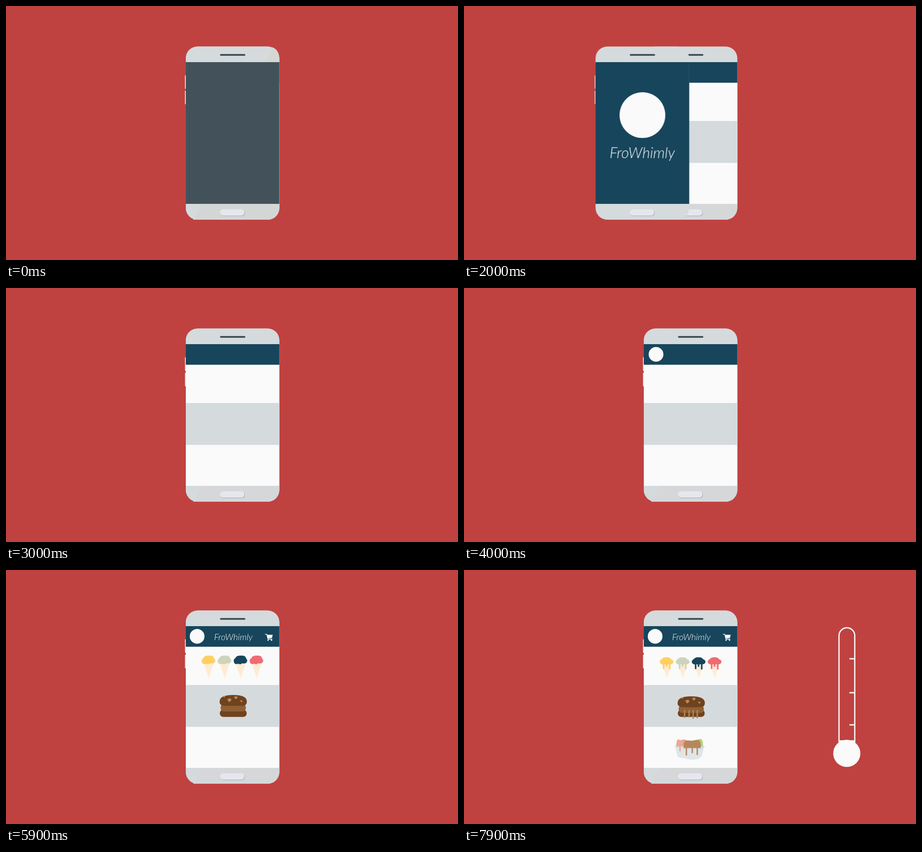
Recreate the animation shown at these times as an HTML page. Size 998 px wide and 561 px high, loop 8000 ms.

```html
<!DOCTYPE html>
<html lang="en">
<head>
<meta charset="utf-8">
<title>Ice cream app</title>
<style>
  html, body { margin: 0; width: 100%; height: 100%; overflow: hidden; background: #bf4240; }
  svg { position: absolute; inset: 0; width: 100%; height: 100%; display: block; }

  /* Every animation spans the whole loop: 1% = 80 ms. */
  .anim, .scoop, .drip, .melt { animation: 8s cubic-bezier(.65, 0, .35, 1) infinite both; }
  .pop { transform-box: fill-box; transform-origin: center; animation-timing-function: cubic-bezier(.33, 1, .68, 1); }

  .name { font: italic 300 33px Lato, sans-serif; fill: #fafafa; text-anchor: middle; }
  .small { font-size: 19.5px; }

  #splash { z-index: 3; animation-name: shuffle, restack; animation-timing-function: cubic-bezier(.65, 0, .35, 1), step-end; }
  #app { z-index: 2; }
  #gauge { z-index: 4; }
  @keyframes shuffle {
    0%, 21.25% { transform: translateX(0); }
    28.75% { transform: translateX(-21.15vw); }
    36.25%, 100% { transform: translateX(0); }
  }
  @keyframes restack { 0% { z-index: 3; } 28.75%, 100% { z-index: 1; } }

  .blue { animation-name: blue; }
  @keyframes blue { 0%, 3.75% { opacity: 0; } 7.5%, 100% { opacity: 1; } }
  .sheen { animation-name: sheen; }
  @keyframes sheen { 0%, 3.75% { opacity: 1; } 15%, 100% { opacity: 0; } }
  .badge { animation-name: badge; }
  @keyframes badge { 0%, 6.25% { transform: scale(0); } 11.25%, 100% { transform: scale(1); } }
  .brand { animation-name: brand; }
  @keyframes brand { 0%, 10% { opacity: 0; } 15%, 100% { opacity: 1; } }

  .logo { animation-name: logo; animation-timing-function: cubic-bezier(.3, .5, .4, 1); }
  @keyframes logo {
    0%, 45% { transform: translateX(-440px); }
    50% { transform: translateX(2px); }
    52.5%, 100% { transform: translateX(0); }
  }
  .title { animation-name: title; }
  @keyframes title { 0%, 51.25% { transform: scale(0); } 55%, 100% { transform: scale(1); } }
  .cart { animation-name: cart; }
  @keyframes cart { 0%, 55% { transform: translateX(430px); } 60%, 100% { transform: translateX(0); } }

  .cone1 { animation-name: cone1; }
  .cone2 { animation-name: cone2; }
  .cone3 { animation-name: cone3; }
  .cone4 { animation-name: cone4; }
  .cake { animation-name: cake; }
  .tub { animation-name: tub; }
  @keyframes cone1 { 0%, 58.125% { transform: scale(0); } 61.875%, 100% { transform: scale(1); } }
  @keyframes cone2 { 0%, 60% { transform: scale(0); } 63.75%, 100% { transform: scale(1); } }
  @keyframes cone3 { 0%, 61.875% { transform: scale(0); } 65.625%, 100% { transform: scale(1); } }
  @keyframes cone4 { 0%, 63.75% { transform: scale(0); } 67.5%, 100% { transform: scale(1); } }
  @keyframes cake { 0%, 68.75% { transform: scale(0); } 72.5%, 100% { transform: scale(1); } }
  @keyframes tub { 0%, 73.75% { transform: scale(0); } 77.5%, 100% { transform: scale(1); } }

  .wipe { transform-origin: 815px 0; animation-name: wipe; }
  @keyframes wipe { 0%, 82.5% { transform: scaleX(0); } 87.5%, 100% { transform: scaleX(1); } }

  /* Melting */
  .drip { transform-box: fill-box; transform-origin: top; animation-name: drip; }
  @keyframes drip { 0%, 88.75% { transform: scaleY(0); } 98.75%, 100% { transform: scaleY(1); } }
  .scoop { animation-name: scoop; }
  @keyframes scoop {
    0%, 88.75% { d: path("M-11 194Q-10 189 1 189Q11 188 12 195Q16 199 14 203Q11 208 3 206Q0 210 -5 207Q-14 210 -15 202Q-16 197 -11 194Z"); }
    98.75%, 100% { d: path("M-11 197Q-6 192 0 193Q6 192 10 197Q16 199 15 204Q14 209 5 208Q0 209 -5 208Q-14 210 -15 203Q-15 199 -11 197Z"); }
  }
  .sag { animation-name: sag; }
  @keyframes sag { 0%, 88.75% { transform: translateY(0); } 98.75%, 100% { transform: translateY(3px); } }
  .pink { fill: #eda692; animation-name: pink; }
  @keyframes pink {
    0%, 88.75% { d: path("M469 391C469 376 476 368 484 368C493 368 499 376 499 391Z"); }
    98.75%, 100% { d: path("M468 391C470 374 470 372 478 376C489 372 495 374 497 391Z"); }
  }
  .green { fill: #b5d26f; animation-name: green; }
  @keyframes green {
    0%, 88.75% { d: path("M499 391C499 376 506 367 515 367C524 367 528 374 528 390Z"); }
    98.75%, 100% { d: path("M499 391C500 376 507 376 515 375C527 370 527 376 528 390Z"); }
  }
  .brown { fill: #b6875a; animation-name: brown; }
  @keyframes brown {
    0%, 88.75% { d: path("M485 394C485 378 493 369 504 369C515 369 523 378 523 394Z"); }
    98.75%, 100% { d: path("M485 394C484 374 488 376 504 377C520 374 523 374 523 394Z"); }
  }
</style>
</head>
<body>
<svg id="app" viewBox="0 0 998 561">
  <defs>
    <g id="frame">
      <rect x="395" y="153" width="5" height="30" rx="1.5" fill="#dcdcde"/>
      <rect x="395" y="187" width="5" height="30" rx="1.5" fill="#dcdcde"/>
      <rect x="397" y="89.5" width="206.5" height="382.5" rx="26" fill="#d5dadd"/>
      <rect x="472.5" y="106" width="56" height="4" rx="2" fill="#43525a"/>
    </g>
    <path id="lower" d="M433 437H603.5V446A26 26 0 0 1 577.5 472H413Z"/>
    <g id="home">
      <rect x="473" y="450" width="54.5" height="14" rx="7" fill="#a9a9b2"/>
      <rect x="472.5" y="449" width="54" height="14" rx="7" fill="#e6e6ee"/>
    </g>
  </defs>
  <use href="#frame"/>
  <use href="#lower" fill="#d6d7d9"/>
  <use href="#home"/>
  <path fill="#fafafa" d="M397 169h206.5v268H397z"/>
  <path fill="#d5dadd" d="M397 254h206.5v92.5H397z"/>
  <path fill="#17455c" d="M397 124h206.5v45.5H397z"/>

  <circle class="anim logo" cx="422" cy="146.5" r="16.3" fill="#fafafa"/>
  <text class="anim pop title name small" x="502" y="155">FroWhimly</text>
  <g class="anim cart" fill="#fafafa">
    <path d="M572.5 142h3.3l2.6 10.6h9" fill="none" stroke="#fafafa" stroke-width="1.6" stroke-linejoin="round" stroke-linecap="round"/>
    <path d="M576 143H588.8L587.4 150L578 151.2Z"/>
    <circle cx="578.7" cy="155" r="1.6"/><circle cx="586.2" cy="155" r="1.6"/>
  </g>

  <g id="cones"></g>

  <g class="anim pop cake">
    <rect x="472" y="308.5" width="59.5" height="16" rx="8" fill="#70431f"/>
    <rect class="anim sag" x="474" y="296" width="55.5" height="16.5" rx="7" fill="#8f6036"/>
    <g class="drips" data-drips="487 309 327,497 309 326,506 309 329,515 309 328" fill="#b2845a"></g>
    <g class="anim sag">
      <path fill="#70431f" d="M472 288Q474 276 502 276Q529 276 531.5 288Q533 298 525 299.5Q502 301 478 299.5Q470 297 472 288Z"/>
      <path fill="#b98b5c" d="M479 279l5-1.5-1 4.500zM488 286l7-3 3 4-5 5zM504 279l8 1-3 5-4-1zM516 288l6 0-1 5z"/>
    </g>
  </g>

  <g class="anim pop tub">
    <path class="melt pink" d="M469 391C469 376 476 368 484 368C493 368 499 376 499 391Z"/>
    <path class="melt green" d="M499 391C499 376 506 367 515 367C524 367 528 374 528 390Z"/>
    <path fill="#e0e6e8" d="M467 391H530L525 412Q512 417 490 415Q473 416 471 411Z"/>
    <path fill="#cfd5d8" d="M466 389h65v2.500h-65z"/>
    <path class="melt brown" d="M485 394C485 378 493 369 504 369C515 369 523 378 523 394Z"/>
    <path fill="#e0e6e8" d="M483 394H525L521 416Q504 422 487 416Z"/>
    <path fill="#cfd5d8" d="M482 393h44v2.500h-44z"/>
    <g class="drips" data-drips="477 389 401" fill="#eda692"></g>
    <g class="drips" data-drips="491 392 410,504 392 405,515 392 409" fill="#b6875a"></g>
  </g>
</svg>

<svg id="splash" class="anim" viewBox="0 0 998 561">
  <use href="#frame"/>
  <g class="anim sheen">
    <path fill="#d6d6d3" d="M588 91Q603 97 603.5 116V124H575Z"/>
    <use href="#lower" fill="#d4d6d6"/>
  </g>
  <use href="#home"/>
  <path fill="#43525a" d="M397 124h206.5v313H397z"/>
  <path class="anim blue" fill="#17455c" d="M397 124h206.5v313H397z"/>
  <circle class="anim pop badge" cx="500.5" cy="241" r="50.500" fill="#fafafa"/>
  <text class="anim brand name" x="500" y="336">FroWhimly</text>
</svg>

<svg id="gauge" viewBox="0 0 998 561">
  <clipPath id="reveal"><rect class="anim wipe" x="815" y="120" width="61" height="320"/></clipPath>
  <g clip-path="url(#reveal)" fill="#fafafa">
    <path d="M828 380V145a17.400 17.400 0 0 1 34.800 0V380M851 196h12M851 271h12M851 342h12" fill="none" stroke="#fafafa" stroke-width="2.800"/>
    <path d="M827 376h37v12h-37z"/>
    <circle cx="845.2" cy="405" r="30"/>
  </g>
</svg>

<script>
  const drips = (list, width) => list.split(',').map(item => {
    const [x, top, bottom] = item.split(' ').map(Number);
    return `<rect class="drip" x="${x - width / 2}" y="${top}" width="${width}" height="${bottom - top}" rx="1.4"/>`;
  }).join('');

  document.querySelectorAll('.drips').forEach(group => {
    group.innerHTML = drips(group.dataset.drips, 3);
  });

  const flavours = ['#ffcf60', '#cdd4bb', '#17455c', '#ef6b73'];
  document.getElementById('cones').innerHTML = flavours.map((colour, i) => `
    <g transform="translate(${447.3 + 35.3 * i} 0)">
      <g class="anim pop cone${i + 1}" fill="${colour}">
        <path fill="#ffebd3" d="M-11 206H11L0.500 239Z"/>
        ${drips('-6.5 203 219,0 203 214,7 203 220', 3.4)}
        <path class="scoop" d="M-11 194Q-10 189 1 189Q11 188 12 195Q16 199 14 203Q11 208 3 206Q0 210 -5 207Q-14 210 -15 202Q-16 197 -11 194Z"/>
      </g>
    </g>`).join('');
</script>
</body>
</html>
```
